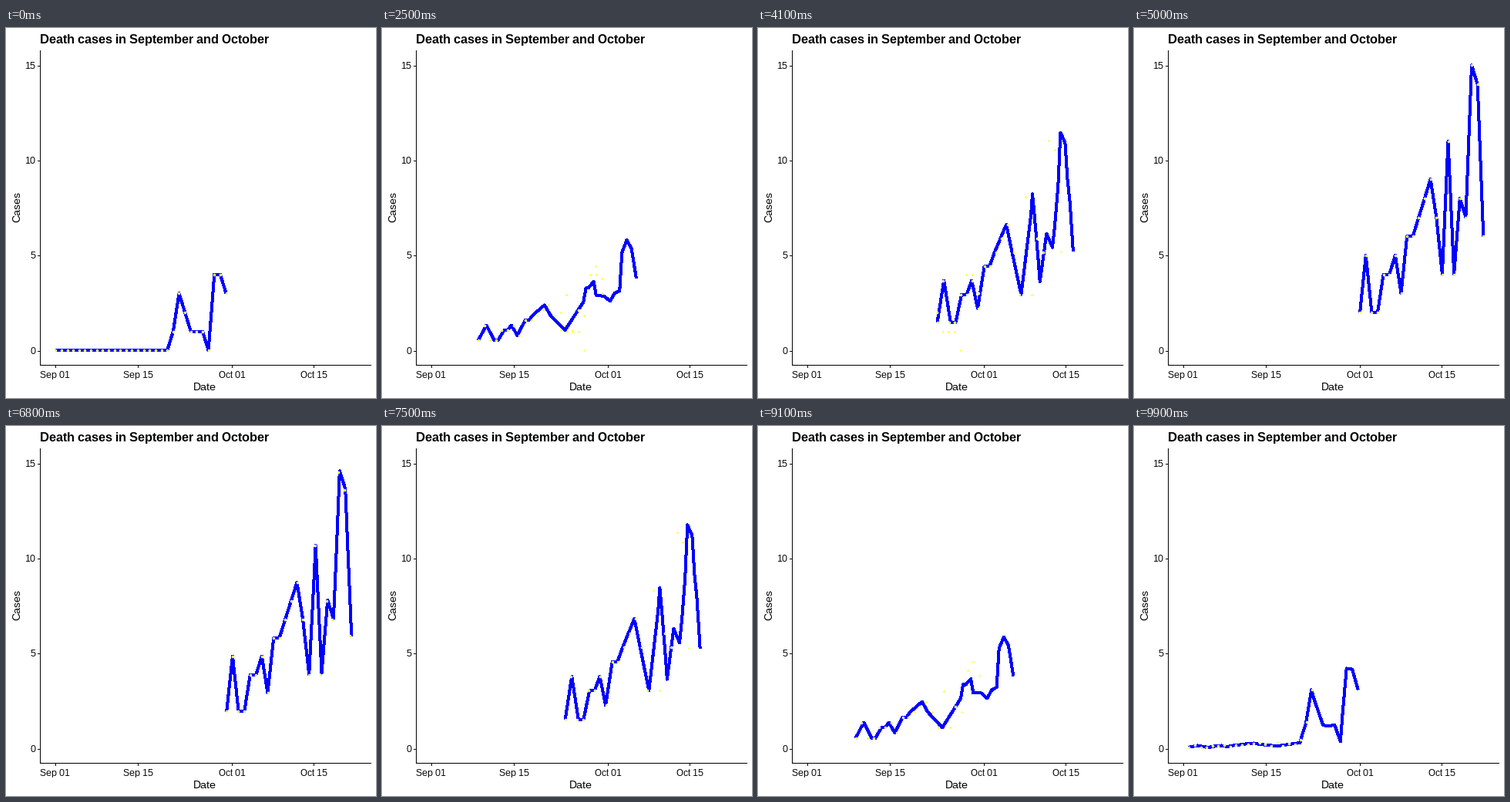
Animation, 480 px wide and 480 px high, one loop 10 s. Source, as a matplotlib script:

```python
import numpy as np
import matplotlib.pyplot as plt
from matplotlib.animation import FuncAnimation

SIZE, DPI = 480, 96
PT = 72 / DPI                      # points per pixel
FRAMES, INTERVAL = 100, 100
X0, DX = 64.35, 7.626              # first day, pixels per day
Y0, DY = 418.2, 24.66              # zero line, pixels per case

SEP = np.array([0] * 20 + [1, 3, 2, 1, 1, 1, 0, 4, 4, 3])
OCT = np.array([2, 5, 2, 2, 4, 4, 5, 3, 6, 6, 7,
                8, 9, 7, 4, 11, 4, 8, 7, 15, 14, 6])
# extra vertices per edge, so both paths have the same length
SEP_CUTS = [1] * 9 + [0] * 10 + [1, 2, 1, 1, 0, 0, 1, 4, 0, 1]
OCT_CUTS = [2, 2, 0, 1, 0, 0, 1, 2, 0, 0, 0, 0, 0, 2, 4, 4, 2, 0, 4, 0, 4]


def to_px(first_day, cases):
    days = first_day + np.arange(len(cases))
    return np.column_stack([X0 + DX * days, Y0 - DY * cases])


def subdivide(pts, cuts):
    at = np.concatenate([[0], np.cumsum(np.array(cuts) + 1)])
    k = np.arange(at[-1] + 1)
    return np.column_stack([np.interp(k, at, pts[:, i]) for i in (0, 1)])


sep, october = to_px(0, SEP), to_px(30, OCT)
sep_path, oct_path = subdivide(sep, SEP_CUTS), subdivide(october, OCT_CUTS)
PAIRS = len(october)

plt.rcParams.update({
    "font.family": "Liberation Sans",
    "text.hinting": "native",      # whole-pixel glyph widths
    "text.hinting_factor": 1,
})
fig = plt.figure(figsize=(SIZE / DPI, SIZE / DPI), dpi=DPI, facecolor="white")
ax = fig.add_axes([0, 0, 1, 1])
ax.set_xlim(0, SIZE)
ax.set_ylim(SIZE, 0)
ax.axis("off")


def rule(x, y):
    """One-pixel line; whole coordinates name pixel column and row + 1."""
    ax.plot(x, y, color="black", lw=PT, antialiased=False,
            solid_capstyle="butt")


def label(x, y, text, size, **kw):
    ax.text(x, y, text, fontsize=size * PT, color="black",
            **{"va": "baseline", "ha": "center", **kw})


rule([44, 44], [29, 437])
rule([44, 473], [437, 437])
for n in (0, 5, 10, 15):
    row = int(Y0 - DY * n)
    rule([41, 44], [row + 1, row + 1])
    label(38.5, row + 5, str(n), 12, ha="right")
for day, text in ((0, "Sep 01"), (14, "Sep 15"), (30, "Oct 01"), (44, "Oct 15")):
    col = int(X0 + DX * day)
    rule([col, col], [437, 440])
    label(col, 454, text, 12)
label(44, 20, "Death cases in September and October", 16, ha="left", weight="bold")
label(258, 470, "Date", 14)
label(18, 232.5, "Cases", 14, rotation=90, rotation_mode="anchor")

line, = ax.plot([], [], color="#0000ff", lw=3 * PT, antialiased=False,
                solid_joinstyle="round", solid_capstyle="butt")
dots, = ax.plot([], [], "o", ms=3 * PT, mfc="#ffff00", mec="white",
                mew=0.6 * PT)


def progress(i):
    """Share of October in the blend."""
    if i < 50:
        return max(0, (i - 16) / 34)
    return 1 - max(0, (i - 67) / 33)


def draw(i):
    p = progress(i)
    path = (1 - p) * sep_path + p * oct_path
    pts = (1 - p) * sep[:PAIRS] + p * october
    if i < 50:                     # unmatched days wait until the change is done
        pts = np.vstack([pts, sep[PAIRS:]])
    line.set_data(path[:, 0], path[:, 1])
    dots.set_data(pts[:, 0], pts[:, 1])
    return line, dots


anim = FuncAnimation(fig, draw, frames=FRAMES, interval=INTERVAL,
                     repeat=True, repeat_delay=0, blit=False)
plt.show()
```
